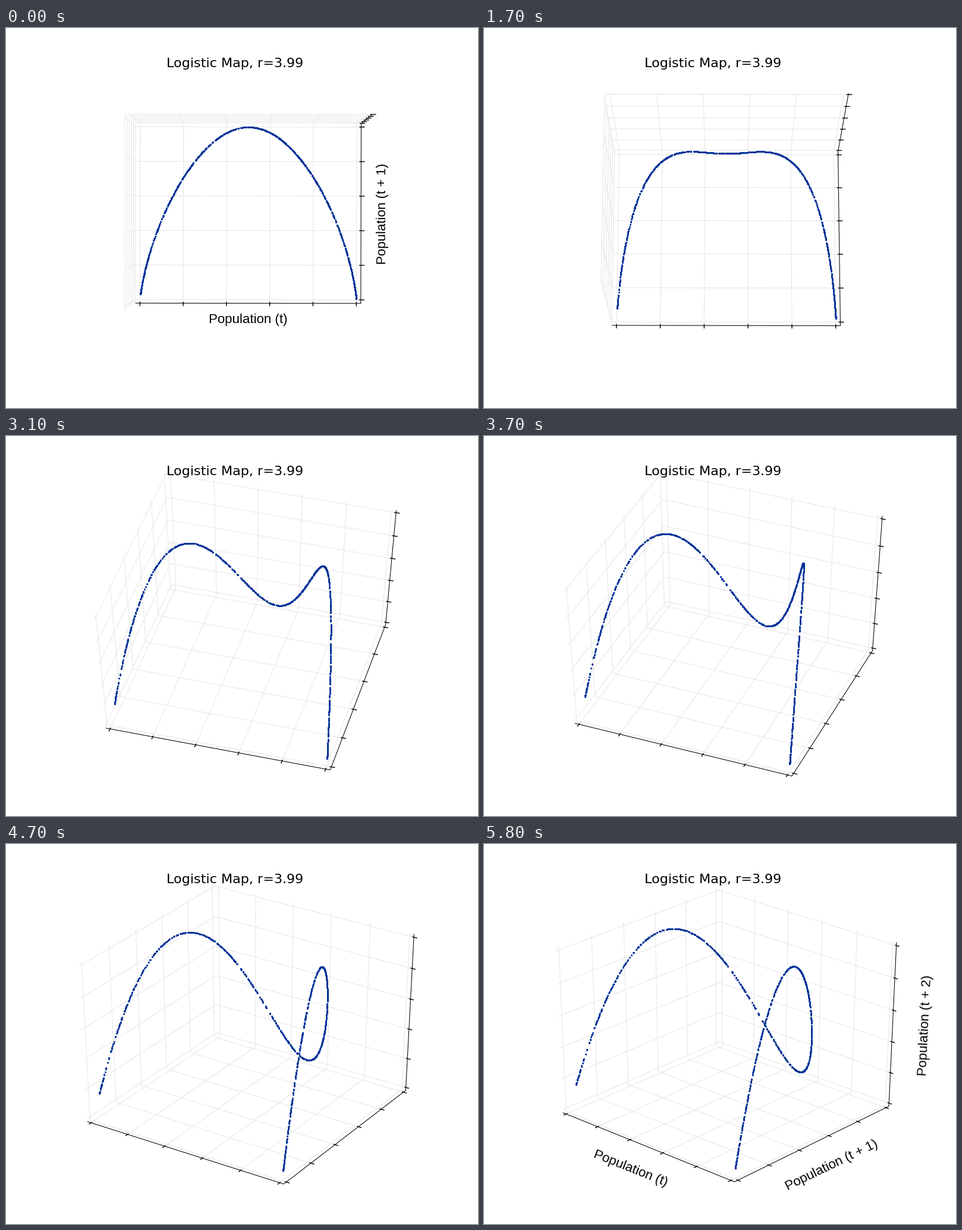
Write a matplotlib script that moves like this. It is 794 by 640 pixels and loops after 5.9 s.

```python
import matplotlib.pyplot as plt
import numpy as np
from matplotlib.animation import FuncAnimation
from matplotlib.collections import LineCollection

W, H, DPI = 794, 640, 100
FRAMES, INTERVAL = 59, 100
RATE, POINTS = 3.99, 1000
DIST = 11.0
CENTER = np.array([407.6, 311.8])
SCALE = np.array([4193.0, -3352.0])
LO, HI = -1 / 48, 1 + 1 / 48
TICK_IN, TICK_OUT = 0.1 / 12, 0.2 / 12
TICKS = np.linspace(0, 1, 6)

# (first step, last step, elevation change, azimuth change) per step
MOVES = [
    (1, 3, -0.5, 0),
    (4, 17, -1.0, 0),
    (18, 41, -1.5, 1.1),
    (42, 45, -1.0, 1.1),
    (46, 54, -0.5, 1.1),
    (55, 57, -0.2, 0.5),
]


def camera(i):
    elev, azim = 89.9, 270.1
    for first, last, de, da in MOVES:
        n = min(max(i - first + 1, 0), last - first + 1)
        elev += n * de
        azim += n * da
    return np.radians(elev), np.radians(azim)


def project(pts, elev, azim):
    """Perspective view of unit-cube points, in stage pixels."""
    se, ce, sa, ca = np.sin(elev), np.cos(elev), np.sin(azim), np.cos(azim)
    d = np.asarray(pts, float) - 0.5
    depth = DIST - d @ [ce * ca, ce * sa, se]
    xy = np.stack([d @ [-sa, ca, 0], d @ [-se * ca, -se * sa, ce]], axis=-1)
    return CENTER + SCALE * xy / depth[..., None]


def orbit(n):
    x = [0.5]
    for _ in range(n - 1):
        x.append(x[-1] * RATE * (1 - x[-1]))
    return np.array([x[:-2], x[1:-1], x[2:]]).T


def grid_lines():
    back = np.array([LO, HI, LO])
    front = np.array([HI, LO, HI])
    lines = []
    for axis in range(3):
        for t in TICKS:
            mid = back.copy()
            mid[axis] = t
            ends = []
            for k in (1, 2):
                end = mid.copy()
                j = (axis + k) % 3
                end[j] = front[j]
                ends.append(end)
            lines.append([ends[0], mid, ends[1]])
    return np.array(lines)


def tick_lines():
    lines = []
    for t in TICKS:
        lines.append([[t, LO + TICK_IN, LO], [t, LO - TICK_OUT, LO]])
        lines.append([[HI - TICK_IN, t, LO], [HI + TICK_OUT, t, LO]])
        lines.append([[HI - TICK_IN, HI, t], [HI + TICK_OUT, HI, t]])
    return np.array(lines)


ORBIT = orbit(POINTS)
GRID = grid_lines()
SPINES = np.array([[[LO, LO, LO], [HI, LO, LO], [HI, HI, LO], [HI, HI, HI]]])
MARKS = tick_lines()

fig = plt.figure(figsize=(W / DPI, H / DPI), dpi=DPI, facecolor="white")
ax = fig.add_axes([0, 0, 1, 1])
ax.set_xlim(0, W)
ax.set_ylim(H, 0)
ax.axis("off")


def strokes(color, width, z):
    return ax.add_collection(
        LineCollection([], colors=color, linewidths=width, zorder=z), autolim=False)


def label(x, y, text, angle):
    return ax.text(x, y, text, rotation=angle, fontsize=16, ha="center",
                   va="center", family="Liberation Sans", zorder=5)


grid = strokes("#e6e6e6", 0.75, 1)
spines = strokes("black", 0.75, 2)
marks = strokes("black", 1.0, 2)
dots = ax.scatter(ORBIT[:, 0], ORBIT[:, 1], s=5, c="#003399", linewidths=0, zorder=3)
ax.text(385, 66, "Logistic Map, r=3.99", fontsize=16, ha="center",
        va="baseline", family="DejaVu Sans", zorder=5)

start_labels = [
    label(407.5, 491.5, "Population (t)", 0),
    label(633, 312.5, "Population (t + 1)", 90),
]
end_labels = [
    label(246.5, 547, "Population (t)", -21.8),
    label(585, 541.5, "Population (t + 1)", 25.9),
    label(743, 306, "Population (t + 2)", 87.3),
]


def draw(i):
    view = camera(i)
    for lines, shape in ((grid, GRID), (spines, SPINES), (marks, MARKS)):
        lines.set_segments(list(project(shape, *view)))
    dots.set_offsets(project(ORBIT, *view))
    for t in start_labels:
        t.set_visible(i == 0)
    for t in end_labels:
        t.set_visible(i == FRAMES - 1)
    return [grid, spines, marks, dots, *start_labels, *end_labels]


anim = FuncAnimation(fig, draw, frames=FRAMES, interval=INTERVAL,
                     init_func=lambda: draw(0), repeat=True, repeat_delay=0)
plt.show()
```
